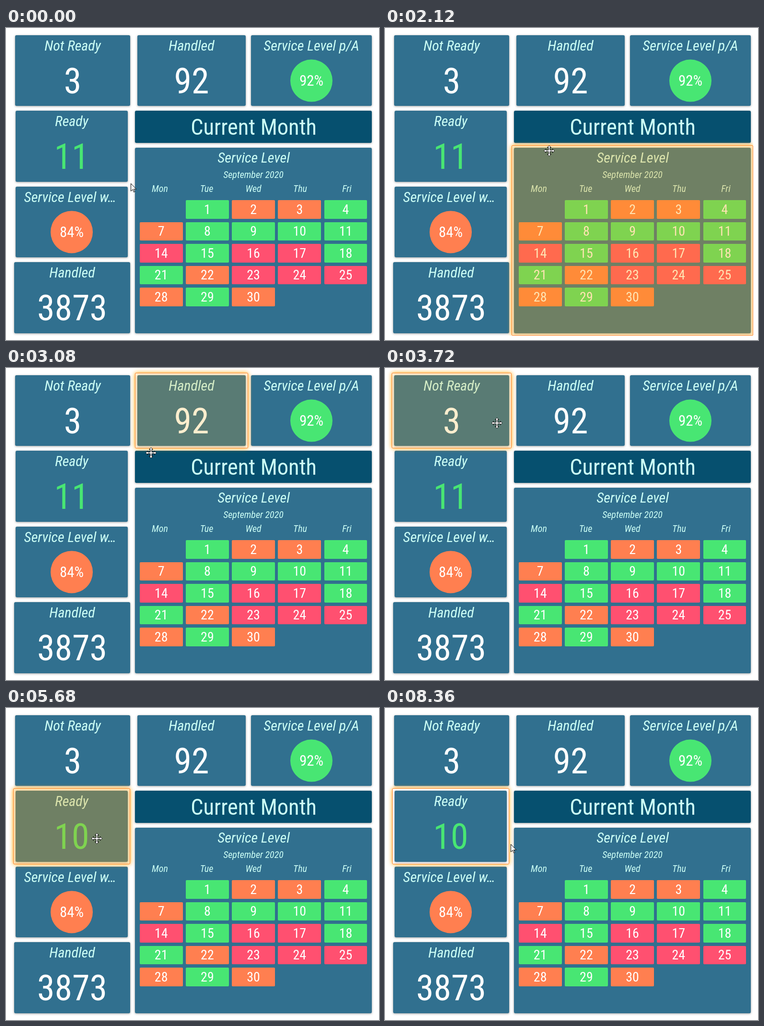
Write an HTML page that moves like this. It is 778x649 px and loops after 8.92 s.

```html
<!DOCTYPE html>
<html lang="en">
<head>
<meta charset="utf-8">
<title>Wallboard</title>
<style>
  html, body { margin: 0; width: 100%; height: 100%; overflow: hidden; background: #fff; }
  svg { position: absolute; left: 0; top: 0; }
  text {
    font-family: "Roboto Condensed", Roboto, sans-serif;
    font-stretch: 75%;
    text-anchor: middle;
    fill: #fff;
  }
  .card { fill: #31708f; filter: drop-shadow(0 1px 2px rgba(0, 0, 0, .37)); }
  .dark { fill: #06506f; }
  .title { font-style: italic; fill: #ccfff6; }
  .head { fill: #ccfff6; }
  .g { fill: #48e673; }
  .o { fill: #ff7f50; }
  .r { fill: #ff5070; }
  #clip { position: absolute; left: 0; top: 0; width: 768px; height: 640px; overflow: hidden; }
  #glow {
    position: absolute;
    box-sizing: border-box;
    border: 1px solid #ff8430;
    border-radius: 2px;
    box-shadow: 0 0 10px orange;
  }
  #arrow, #move { fill: #fff; stroke: #000; }
</style>
</head>
<body>
<svg id="board" width="778" height="649"></svg>
<div id="clip"><div id="glow"></div></div>
<svg width="778" height="649">
  <path id="arrow" d="M.5 .5V16.4L4.2 12.9 6.6 18.4 8.8 17.5 6.4 12.1H11.6Z"/>
  <path id="move" d="M0-11 4-7H1.5V-1.5H7V-4L11 0 7 4V1.5H1.5V7H4L0 11-4 7H-1.5V1.5H-7V4L-11 0-7-4V-1.5H-1.5V-7H-4Z"/>
</svg>
<script>
const LOOP = 8920, STEP = 40, FADE = 300, LEAVE = 7520, GAP = 5;
const $ = id => document.getElementById(id);
const board = $('board');

function add(tag, attrs, content = '') {
  const el = document.createElementNS('http://www.w3.org/2000/svg', tag);
  for (const key in attrs) el.setAttribute(key, attrs[key]);
  el.textContent = content;
  return board.appendChild(el);
}

// Where only the normal width of the face exists, narrow it to the condensed digit width.
function narrowing(cls) {
  const probe = add('text', { class: cls, 'font-size': 100 }, '0000');
  const ratio = 197.3 / probe.getComputedTextLength();
  probe.remove();
  return Math.abs(ratio - 1) < .03 ? 1 : ratio;
}
const upright = narrowing(''), italic = narrowing('title');

function label(str, x, y, size, cls = '') {
  const k = cls === 'title' ? italic : upright;
  return add('text', { class: cls, 'font-size': size, transform: `translate(${x} ${y}) scale(${k} 1)` }, str);
}

// Rectangle with its edges snapped to whole pixels
function box(left, top, right, bottom, rx, cls) {
  const [x, y, x2, y2] = [left, top, right, bottom].map(Math.round);
  const area = { x, y, width: x2 - x, height: y2 - y };
  add('rect', { ...area, rx, class: cls });
  return area;
}

const rowTop = row => 15 + 157.4 * row;

// A tile with a title above a big number, or above a percentage in a disc
function tile(row, left, right, name, value, cls) {
  const top = rowTop(row), mid = (left + right) / 2;
  const area = box(left, top, right, top + 147.4, 3, 'card');
  label(name, mid, Math.round(top + 31.7), 30, 'title');
  if (value.endsWith('%')) {
    add('circle', { cx: mid, cy: top + 94.6, r: 44, class: cls });
    area.text = label(value, mid, Math.round(top + 105.2), 31);
  } else {
    area.text = label(value, mid, Math.round(top + 121), 74, cls);
  }
  return area;
}

const idle = tile(0, 19, 259, 'Not Ready', '3');
const handled = tile(0, 274, 500, 'Handled', '92');
tile(0, 511, 763, 'Service Level p/A', '92%', 'g');
const ready = tile(1, 20, 254, 'Ready', '11', 'g');
tile(2, 20, 254, 'Service Level w…\u00a0', '84%', 'o');
tile(3, 17, 259, 'Handled', '3873');

const month = box(269, rowTop(1), 763, 239, 3, 'card dark');
label('Current Month', 516.5, 221.5, 46.5, 'head');

const calendar = box(269, 249, 763, 635, 3, 'card');
label('Service Level', 516.5, 280, 30, 'title');
label('September 2020', 516, 312, 20, 'title');
['Mon', 'Tue', 'Wed', 'Thu', 'Fri'].forEach((day, i) => label(day, 321 + 97.5 * i, 341, 20, 'title'));

// One letter per weekday; the month starts on a Tuesday
[...'googoggggrgrrggorrrogo'].forEach((level, i) => {
  const col = (i + 1) % 5, row = Math.floor((i + 1) / 5);
  const x = 278.7 + 96.2 * col, y = 358.3 + 45.4 * row;
  box(x, y, x + 89.9, y + 38.6, 2, level);
  label(col + 7 * row, x + 45, Math.round(y + 28.6), 28);
});

// Pointer moves: start, end, then the place reached; it rests in between
const moves = [
  [640, 1280, 288, 321], [1400, 2400, 363, 230], [2520, 3720, 233, 114],
  [3800, 4560, 169, 199], [4640, 5400, 177, 265], [5560, 5680, 189, 271],
  [6360, 7000, 254, 281], [7080, 7160, 260, 290], [7480, 7520, 260, 283],
  [8160, 8360, 262, 283]
];
const hovers = [[640, calendar], [2240, month], [2960, handled], [3600, idle], [4360, ready]];

const progress = (t, start, end) => Math.min(1, Math.max(0, (t - start) / (end - start)));

function pointerAt(t) {
  let x = 260, y = 323;
  for (const [start, end, toX, toY] of moves) {
    const p = progress(t, start, end);
    x += (toX - x) * p;
    y += (toY - y) * p;
  }
  return [Math.round(x), Math.round(y)];
}

function showCursor(id, visible, x, y) {
  $(id).style.display = visible ? '' : 'none';
  $(id).setAttribute('transform', `translate(${x} ${y})`);
}

function render(now) {
  const t = Math.floor(now % LOOP / STEP) * STEP;
  const hover = hovers.findLast(([start]) => start <= t);
  const inside = hover && t < LEAVE;

  const [x, y] = pointerAt(t);
  showCursor('arrow', !inside, x, y);
  showCursor('move', inside, x + .5, y + .5);

  const glow = $('glow').style;
  glow.display = hover ? '' : 'none';
  if (hover) {
    const [start, area] = hover;
    glow.left = area.x - GAP + 'px';
    glow.top = area.y - GAP + 'px';
    glow.width = area.width + 2 * GAP + 'px';
    glow.height = area.height + 2 * GAP + 'px';
    const eased = 1 - (1 - progress(t, start, start + FADE)) ** 2;
    glow.background = `rgba(255, 165, 0, ${inside ? .3 * eased : 0})`;
  }

  ready.text.textContent = t < 5600 ? '11' : '10';
}

let first;
function tick(now) {
  first ??= now;
  render(now - first);
  requestAnimationFrame(tick);
}
render(0);
requestAnimationFrame(tick);
</script>
</body>
</html>
```
